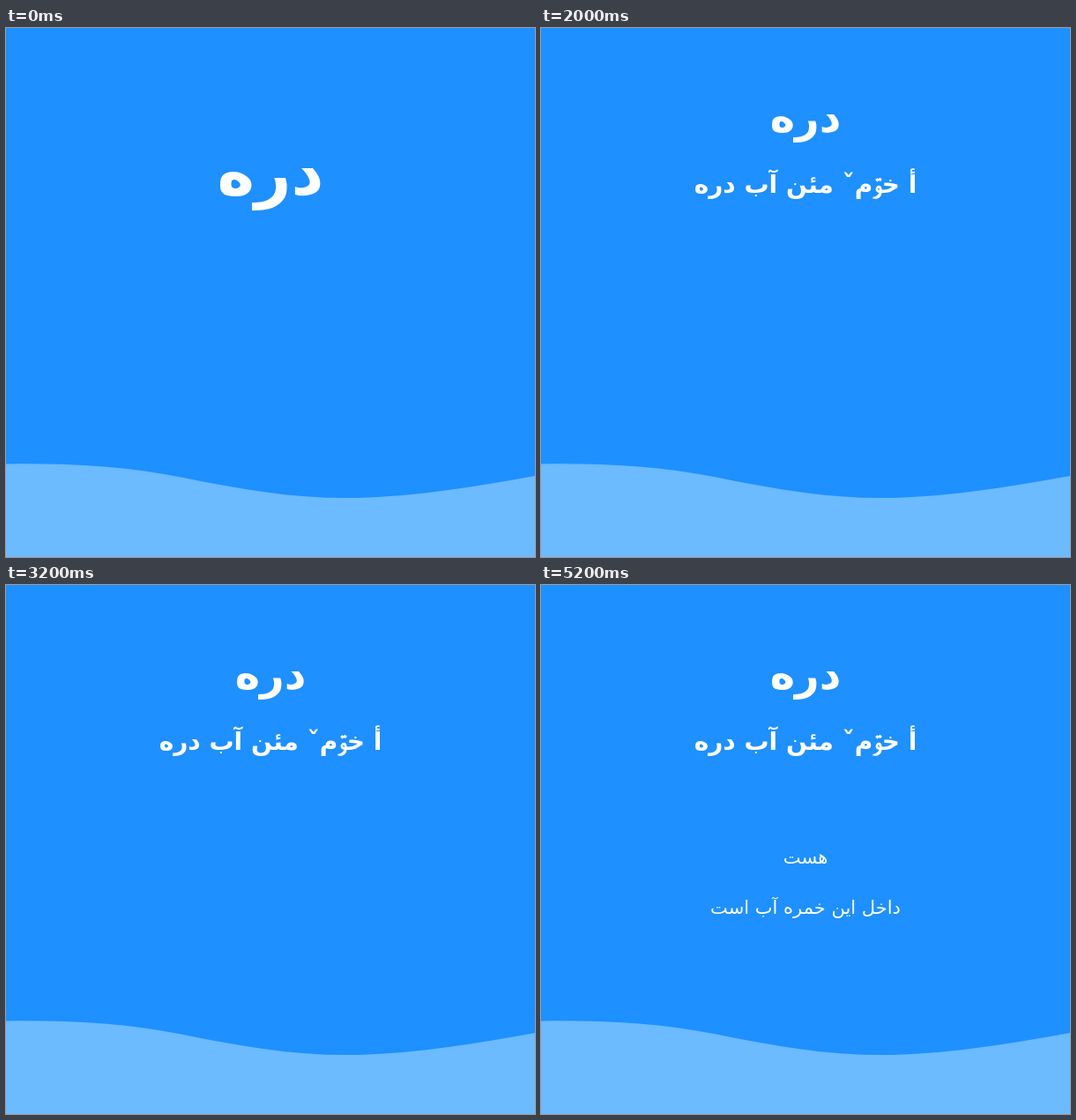
Animation of 600x600 px, one loop 6 s. Source, as an HTML page with a canvas:

```html
<!DOCTYPE html>
<html lang="fa">
<head>
<meta charset="utf-8">
<style>
  html, body { margin: 0; width: 100%; height: 100%; overflow: hidden; background: #1e90ff; }
  canvas { display: block; }
</style>
</head>
<body>
<canvas id="stage" width="600" height="600"></canvas>
<script>
const ctx = document.getElementById('stage').getContext('2d');
const LOOP = 6000;
const STEP = 2000;
const FONT = '"DejaVu Sans", "Noto Sans", sans-serif';

function drawLine(text, baseline, size, weight = 'bold') {
  ctx.font = `${weight} ${size}px ${FONT}`;
  ctx.fillText(text, 300, baseline);
}

function drawWave() {
  ctx.fillStyle = '#6cbaff';
  ctx.beginPath();
  ctx.moveTo(0, 494.4);
  ctx.bezierCurveTo(67, 493.5, 133, 496.4, 200, 509.7);
  ctx.bezierCurveTo(267, 523.6, 333, 534.6, 400, 532.9);
  ctx.bezierCurveTo(467, 531.2, 533, 520, 600, 508);
  ctx.lineTo(600, 600);
  ctx.lineTo(0, 600);
  ctx.fill();
}

function render(time) {
  const step = Math.floor((time % LOOP) / STEP);
  ctx.fillStyle = '#1e90ff';
  ctx.fillRect(0, 0, 600, 600);
  drawWave();

  ctx.fillStyle = '#fff';
  ctx.textAlign = 'center';
  ctx.textBaseline = 'alphabetic';
  ctx.direction = 'rtl';

  if (step === 0) {
    drawLine('دره', 189, 72);
  } else {
    drawLine('دره', 118, 48);
    drawLine('أ خۊمˇ مئن آب دره', 187, 28);
  }
  if (step === 2) {
    drawLine('هست', 316, 21, 'normal');
    drawLine('داخل این خمره آب است', 373, 21, 'normal');
  }
}

const start = performance.now();
function tick() {
  render(performance.now() - start);
  requestAnimationFrame(tick);
}
tick();
</script>
</body>
</html>
```
